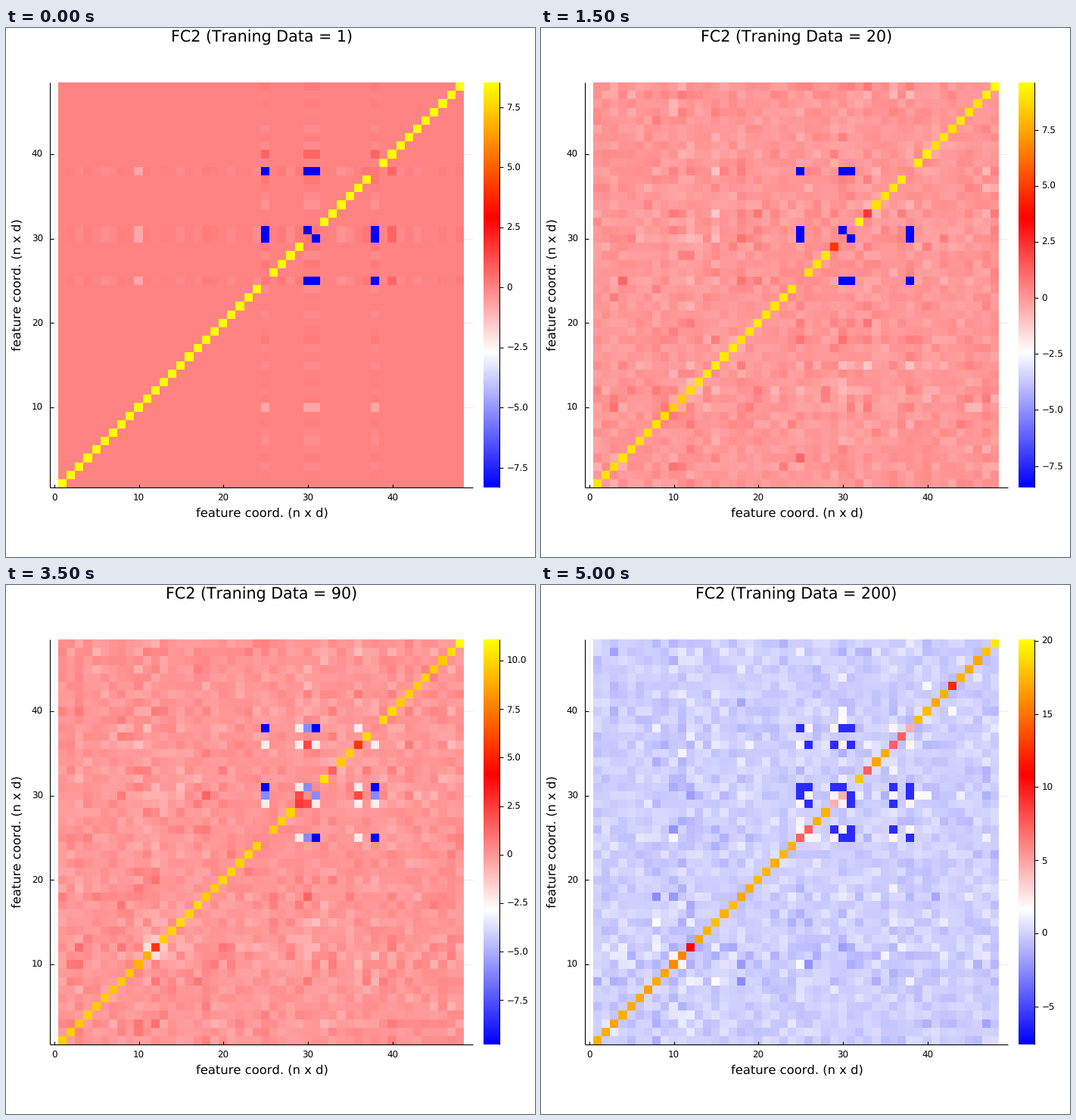
A matplotlib script for the animation above (5.5 s loop, 699 by 700 pixels).

```python
import matplotlib.pyplot as plt
import numpy as np
from matplotlib.animation import FuncAnimation
from matplotlib.colors import LinearSegmentedColormap

W, H, DPI = 699, 700, 100
N = 48
LEFT, RIGHT, TOP, BOTTOM = 69.42, 605.42, 71.92, 607.92
CELL = (RIGHT - LEFT) / N
AXIS_X0, AXIS_X1, AXIS_Y = 58.3, 617, 608.3
BAR_X0, BAR_X1, BAR_Y0, BAR_Y1 = 631, 652, 72, 608
PX = 72 / DPI
CMAP = LinearSegmentedColormap.from_list(
    "heat", ["blue", "white", "red", "yellow"], N=768)
plt.rcParams.update({"font.family": "DejaVu Sans",
                     "text.hinting": "no_hinting",
                     "text.kerning_factor": 6})

# ---- data: a strong diagonal, coupled coordinates and growing noise ----

INDEX = np.arange(1, N + 1)
CORE = (25, 30, 31, 38)
TRIO = (25, 31, 38)
MIRROR = (26, 29, 31, 36)
LOUD = (3, 8, 10, 12, 15, 18, 25, 30, 36, 38, 40, 47)
LIGHT, DARK = (8, 12, 15, 47), (10, 18, 20, 35, 48)


def rows(*picks):
    return np.isin(INDEX, picks).astype(float)


def bump(center, width):
    return np.exp(-((INDEX - center) / width) ** 2)


def cross(a, b):
    return np.outer(a, b) + np.outer(b, a)


def noise(seed, w):
    """Symmetric noise whose strength grows with the weights of row and column."""
    g = np.triu(np.random.RandomState(seed).normal(size=(N, N)))
    return (g + np.triu(g, 1).T) * (w[:, None] + w)


def couple(m, a, b, value):
    for i in a:
        for j in b:
            m[i - 1, j - 1] = m[j - 1, i - 1] = value


def diagonal(m, base, jitter, soft):
    """Fill the diagonal; soft maps a coordinate to its share of the base."""
    d = base * (1 + jitter * (np.random.RandomState(9).normal(size=N)
                              - 5 * bump(11, 1.5)))
    d[-1] = 1.12 * base
    for k in CORE:
        d[k - 1] = .03 * base
    for k, share in soft.items():
        d[k - 1] = share * base
    np.fill_diagonal(m, d)
    return m


def early(off, base, jitter, soft):
    m = off.copy()
    couple(m, CORE, CORE, -8.4)
    return diagonal(m, base, jitter, soft)


def middle(off, base, soft):
    m = off.copy()
    couple(m, TRIO, TRIO, -9.7)
    couple(m, TRIO, (30,), -6)
    couple(m, TRIO + (29,), (29, 36), -2.3)
    couple(m, (30,), (29, 36), 2.2)
    return diagonal(m, base, .02, soft)


def late(off, base, main):
    m = off.copy()
    couple(m, CORE, MIRROR, 2)
    couple(m, CORE, CORE, main)
    couple(m, MIRROR, MIRROR, main)
    soft = dict.fromkeys((25, 26, 33, 36, 37), .43)
    soft.update(dict.fromkeys((29, 30, 38), .26))
    soft.update({12: .64, 31: 0})
    return diagonal(m, base, .02, soft)


def mix(a, b, t):
    return a + (b - a) * t


tone = np.random.RandomState(4).normal(size=N)
first = .15 * tone + .6 * (rows(40) - rows(10))
wave = .2 * tone + .5 * rows(*DARK) - .75 * rows(*LIGHT)
stripes = .2 + .7 * rows(*LOUD) + .8 * bump(11, 1.3)
patch = np.outer(bump(12, 2), bump(12, 2))

off1 = cross(rows(*CORE), first)
off5 = noise(1, .03 + .1 * abs(wave)) + cross(rows(33, *CORE), wave)
off20 = .6 * off5 + noise(2, .06 + .1 * stripes)
off50 = off20 + noise(3, .03 * (INDEX > 2)) - .4 * patch
off90 = .6 * off20 + noise(5, .07 + .13 * stripes) - patch
off120 = noise(6, .08 + .22 * stripes) - patch
off200 = .6 * off120 + noise(7, .09 + .25 * stripes) - .1 - .6 * patch

m1 = early(off1, 8.54, 0, {})
m5 = early(off5, 9, .006, {33: .25})
m20 = early(off20, 9, .016, {33: .25, 29: .54})
m50 = early(off50, 9, .016, {33: .25, 29: .54, 36: .72})
m90 = middle(off90, 9.8, {33: .15, 29: .27, 36: .57, 12: .57})
m120 = late(off120, 16, -6.3)
m200 = late(off200, 17.2, -6)
np.fill_diagonal(m200, np.where(rows(43), 12.3, m200.diagonal()))
m10 = m5.copy()
m10[9:, 9:] = mix(m5, m20, .35)[9:, 9:]
m30 = m20.copy()
m30[35, 35] = m50[35, 35]

# training size, matrix, colour range
STAGES = [
    (1, m1, -8.33, 8.54), (5, m5, -8.47, 9.18), (10, m10, -8.47, 9.3),
    (20, m20, -8.46, 9.62), (30, m30, -8.45, 9.55), (50, m50, -8.42, 9.43),
    (70, mix(m50, m90, .5), -9.1, 10.2), (90, m90, -9.78, 11.09),
    (120, m120, -7.75, 17.44), (150, mix(m120, m200, .5), -7.7, 18.7),
    (200, m200, -7.6, 20.1),
]

# ---- drawing ----

fig = plt.figure(figsize=(W / DPI, H / DPI), dpi=DPI, facecolor="white")
ax = fig.add_axes([0, 0, 1, 1])
ax.axis("off")


def line(xs, ys, color="black", width=1.1, z=3):
    return ax.plot(xs, ys, color=color, lw=width * PX, zorder=z,
                   solid_capstyle="butt")[0]


def label(x, y, s, px, **kw):
    return ax.text(x, y, s, fontsize=px * PX, **kw)


def image(data, *extent):
    return ax.imshow(data, cmap=CMAP, origin="lower", aspect="auto",
                     interpolation="nearest", extent=extent, zorder=2)


heat = image(m1, LEFT, RIGHT, BOTTOM, TOP)
image(np.linspace(0, 1, BAR_Y1 - BAR_Y0)[:, None],
      BAR_X0, BAR_X1, BAR_Y1, BAR_Y0)
ax.set_xlim(0, W)
ax.set_ylim(H, 0)

line([AXIS_X0, AXIS_X0], [BAR_Y0, AXIS_Y])
line([AXIS_X0, AXIS_X1], [AXIS_Y, AXIS_Y])
line([BAR_X1 + .3] * 2, [BAR_Y0, AXIS_Y])
for k in range(0, 50, 10):
    x = LEFT + (k - .5) * CELL
    line([x, x], [BAR_Y0, BAR_Y1], "#e8e8e8", .8, 1)
    line([x, x], [AXIS_Y, AXIS_Y - 4.5])
    label(x, 626, str(k), 11.85, ha="center")
    if k:
        y = BOTTOM - (k - .5) * CELL + .3
        line([AXIS_X0, AXIS_X1], [y, y], "#e8e8e8", .8, 1)
        line([AXIS_X0, AXIS_X0 + 4.5], [y, y])
        label(49, y + 4.1, str(k), 11.85, ha="right")

NAME = "feature coord. (n x d)"
label(338, 646.4, NAME, 16.35, ha="center")
label(20, 340, NAME, 16.35, ha="center", va="baseline", rotation=90,
      rotation_mode="anchor")
title = label(337.6, 18.3, "", 20.7, ha="center")
marks = [(line([BAR_X1, BAR_X1 + 5], [0, 0]), label(661.5, 0, "", 11.85))
         for _ in range(10)]


def draw(n):
    size, data, lo, hi = STAGES[n]
    title.set_text(f"FC2 (Traning Data = {size})")
    heat.set_data(data)
    heat.set_clim(lo, hi)
    step = 2.5 if hi - lo < 22 else 5
    ticks = np.arange(np.ceil(lo / step), np.floor(hi / step) + 1) * step
    for i, (mark, text) in enumerate(marks):
        shown = i < len(ticks)
        mark.set_visible(shown)
        text.set_visible(shown)
        if shown:
            v = ticks[i]
            y = BAR_Y1 - (v - lo) / (hi - lo) * (BAR_Y1 - BAR_Y0)
            s = f"{v:.1f}" if step == 2.5 and v else f"{v:.0f}"
            mark.set_ydata([y, y])
            text.set_y(y + 4.2)
            text.set_text(s.replace("-", "\u2212") if v else "0")
    return []


anim = FuncAnimation(fig, draw, frames=len(STAGES), interval=500,
                     repeat=True, repeat_delay=0, blit=False)
plt.show()
```
